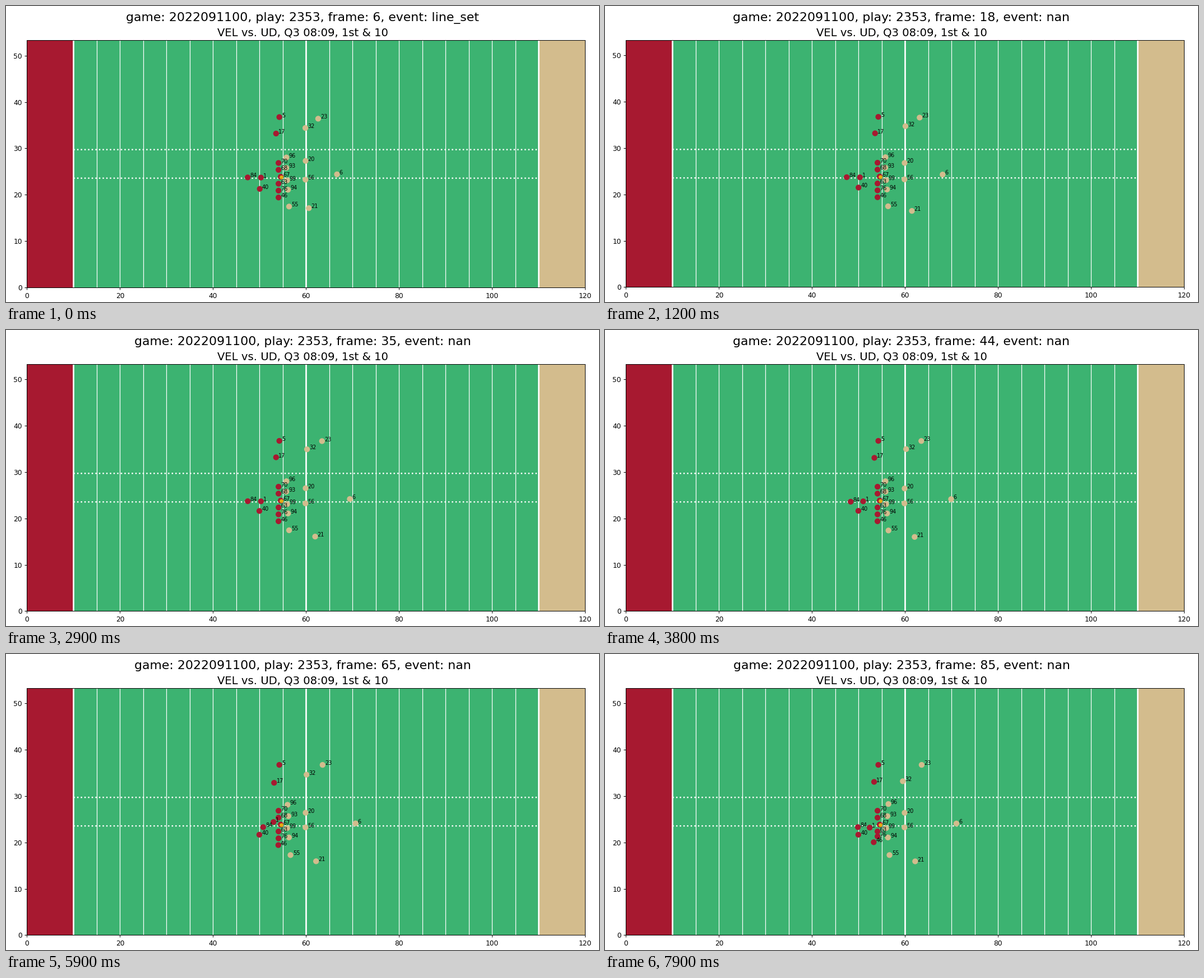
These frames come from a looping animation (1058x529 px, 8000 ms). A matplotlib script:

```python
import numpy as np
import matplotlib.pyplot as plt
from matplotlib.animation import FuncAnimation
from matplotlib.patches import Rectangle

W, H = 1058, 529
FRAMES, INTERVAL = 80, 100
FIRST = 6
RED, TAN, GRASS, GOLD = "#a71930", "#d3bc8d", "mediumseagreen", "#e3ae10"
LENGTH, WIDTH = 120, 53.3
STEP = np.arange(FRAMES)[:, None]


def settle(dx, dy, tau=15):
    """Drift that starts fast and dies away."""
    return (1 - np.exp(-STEP / tau)) * [dx, dy]


def shift(start, end, dx, dy):
    """Smooth move between two steps."""
    u = np.clip((STEP - start) / (end - start), 0, 1)
    return u * u * (3 - 2 * u) * [dx, dy]


def track(x, y, *moves):
    return sum(moves, np.zeros((FRAMES, 2))) + [x, y]


# offensive line: evenly spaced, the center leaning over the ball
line_moves = {76: [shift(58, 86, 0, 0.5)], 46: [shift(55, 88, -1, 0.8)]}
offense = {
    n: track(54.55 if n == 67 else 54.08, y, *line_moves.get(n, []))
    for n, y in zip((70, 68, 67, 63, 76, 46), np.linspace(26.85, 19.4, 6))
}
offense |= {
    5: track(54.25, 36.75),
    17: track(53.55, 33.2, shift(30, 50, -0.42, -0.32),
              shift(60, 80, 0.22, 0.2)),
    84: track(47.45, 23.73, shift(28, 58, 3.33, -0.42),
              shift(70, 84, -1.3, 0)),
    1: track(50.3, 23.7, shift(28, 58, 2.7, 0), shift(44, 60, 0, 0.72),
             shift(62, 84, -0.7, -1.4)),
    40: track(50.05, 21.26, settle(-0.1, 0.42)),
}
defense = {
    96: track(55.78, 28.04, shift(50, 72, 0.64, 0.26)),
    93: track(55.74, 25.8, shift(32, 58, 0.46, -0.12)),
    99: track(55.93, 23.1),
    94: track(56.12, 21.08, shift(46, 59, 0.2, 0)),
    55: track(56.35, 17.45, shift(30, 54, 0.3, -0.17)),
    56: track(59.87, 23.25),
    20: track(59.9, 27.3, settle(0, -0.9)),
    32: track(59.85, 34.4, settle(0.42, 0.62), shift(52, 76, -0.75, -1.8)),
    23: track(62.6, 36.4, settle(0.97, 0.35)),
    21: track(60.6, 17.1, settle(1.58, -1.18)),
    6: track(66.65, 24.4, settle(4.9, -0.35, tau=35)),
}
ball = track(54.72, 23.75)
players = offense | defense
paths = np.array([*players.values(), ball])

fig = plt.figure(figsize=(12, 6), dpi=W / 12, facecolor="white")
plt.rcParams["font.family"] = "DejaVu Sans"
ax = fig.add_axes([0, 0, 1, 1])
ax.set_xlim(0, LENGTH)
ax.set_ylim(0, WIDTH)
ax.set_xticks(range(0, 121, 20))
ax.set_yticks(range(0, 51, 10))
ax.tick_params(labelsize=10)


def place_axes(top, bottom):
    left, right = 37.4, 1033.3
    ax.set_position([left / W, 1 - bottom / H,
                     (right - left) / W, (bottom - top) / H])


# field
for x, w, color in [(0, 10, RED), (10, 100, GRASS), (110, 10, TAN)]:
    ax.add_patch(Rectangle((x, 0), w, WIDTH, facecolor=color, lw=0, zorder=0))
for x in range(10, 111, 5):
    ax.axvline(x, color="white", lw=2.2 if x % 50 == 10 else 1, zorder=1)
for side in (-1, 1):
    y = WIDTH / 2 + side * 3.08
    ax.plot([10, 110], [y, y], color="white", ls=":", lw=2, zorder=1,
            snap=False)

title = fig.text(0.5, 0.98, "", fontsize=18, ha="center", va="top")
fig.text(0.5, 1 - 53.5 / H, "VEL vs. UD, Q3 08:09, 1st & 10",
         fontsize=16, ha="center", va="baseline")

# players, then the ball on top
colors = [RED] * len(offense) + [TAN] * len(defense) + [GOLD]
sizes = [55] * len(players) + [20]
dots = ax.scatter(*paths[:, 0].T, s=sizes, c=colors, zorder=3)
tags = [ax.text(0, 0, str(n), fontsize=8, zorder=5) for n in players]


def update(i):
    event = "nan" if i else "line_set"
    # the underscore's descent pushes the axes down a little
    place_axes(*((61.1, 502.4) if i else (61.4, 502.95)))
    title.set_text(f"game: 2022091100, play: 2353, "
                   f"frame: {FIRST + i}, event: {event}")
    spots = paths[:, i]
    dots.set_offsets(spots)
    for tag, (x, y) in zip(tags, spots):
        tag.set_position((x + 0.5, y))
    return []


anim = FuncAnimation(fig, update, frames=FRAMES, interval=INTERVAL,
                     init_func=lambda: [], repeat=True, repeat_delay=0)
plt.show()
```
